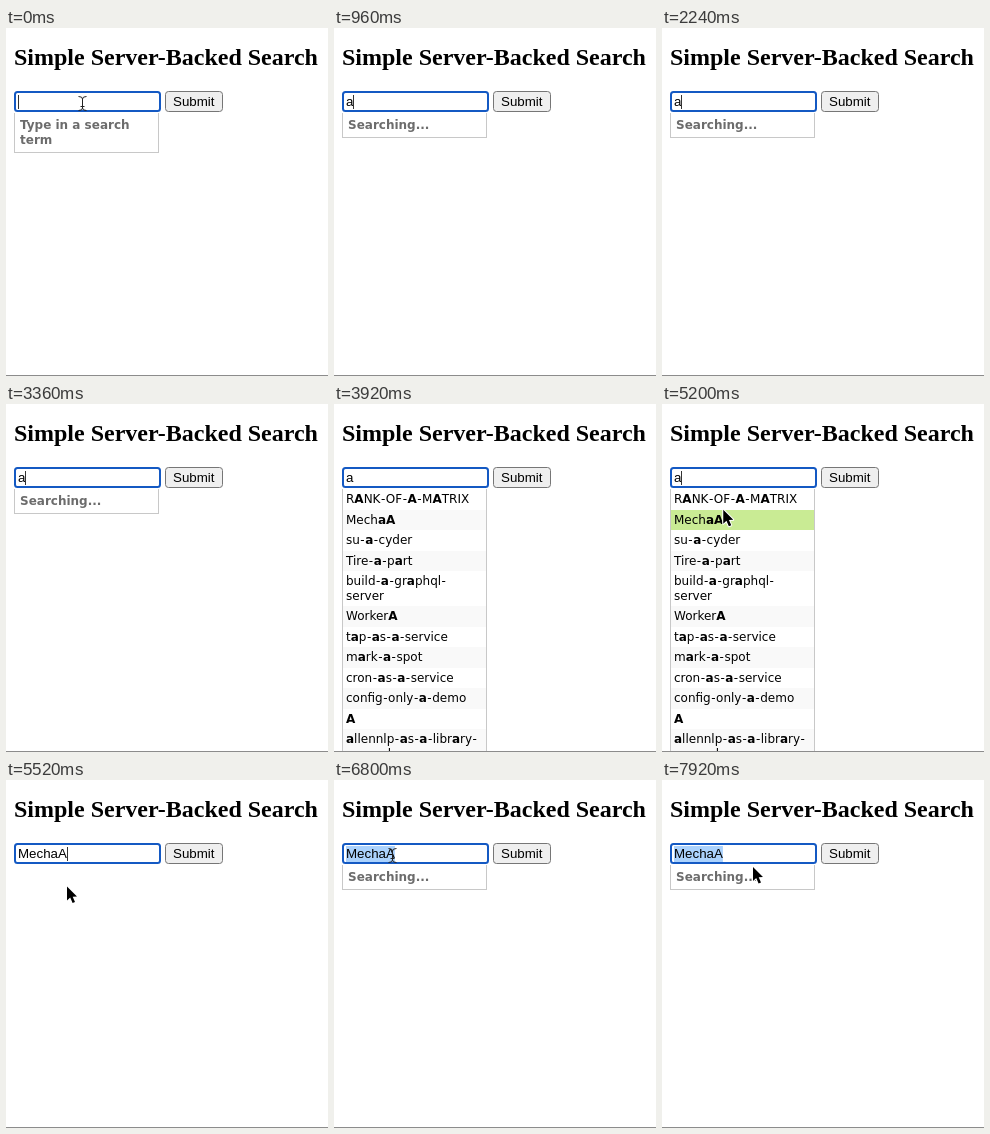
These frames come from a looping animation (322 px wide and 348 px high, 8 s). An HTML page with a canvas:

```html
<!DOCTYPE html>
<html lang="en">
<head>
<meta charset="utf-8">
<title>Simple Server-Backed Search</title>
<style>
html, body { margin: 0; width: 100%; height: 100%; overflow: hidden; background: #fff; }
canvas { display: block; width: 322px; height: 348px; }
</style>
</head>
<body>
<canvas id="stage"></canvas>
<script>
const W = 322, H = 348, LOOP = 8000;
const canvas = document.getElementById('stage');
const ctx = canvas.getContext('2d');
const dpr = window.devicePixelRatio || 1;
canvas.width = W * dpr;
canvas.height = H * dpr;

const SERIF = 'bold 24px "Liberation Serif", "Times New Roman", serif';
const SANS = '13.333px "Liberation Sans", Arial, sans-serif';
const VERDANA = '"DejaVu Sans", Verdana, sans-serif';
const REGULAR = '12px ' + VERDANA, BOLD = 'bold 12px ' + VERDANA;

const LIST_TOP = 85, LINE = 14.5;
const TYPED = 960, SLIDE = 3680, SLIDE_MS = 160, PICKED = 5440, SELECTED = 6720;

const results = [
  'RANK-OF-A-MATRIX', 'MechaA', 'su-a-cyder', 'Tire-a-part',
  'build-a-graphql-|server', 'WorkerA', 'tap-as-a-service', 'mark-a-spot',
  'cron-as-a-service', 'config-only-a-demo', 'A', 'allennlp-as-a-library-|example'
].map(name => name.split('|'));

// Pointer stops: time, x, y
const path = [
  [4480, 76, 75], [4800, 62, 103.5], [5040, 62, 103.5], [5280, 61, 106.5],
  [5920, 61, 106.5], [6400, 58, 75], [6800, 58, 75], [7280, 91, 87]
];

const ease = p => p * p * (3 - 2 * p);

function pointerAt(t) {
  if (t < TYPED) return { x: 76, y: 75 };
  if (t < path[0][0]) return null;
  for (let i = 1; i < path.length; i++) {
    const [t0, x0, y0] = path[i - 1], [t1, x1, y1] = path[i];
    if (t < t1) {
      const p = ease((t - t0) / (t1 - t0));
      return { x: x0 + (x1 - x0) * p, y: y0 + (y1 - y0) * p };
    }
  }
  const [, x, y] = path[path.length - 1];
  return { x, y };
}

function text(str, x, y, font, color) {
  ctx.font = font;
  ctx.fillStyle = color;
  ctx.fillText(str, x, y);
  return ctx.measureText(str).width;
}

function rect(x, y, w, h, color) {
  ctx.fillStyle = color;
  ctx.fillRect(x, y, w, h);
}

function box(x, y, w, h, r, fill, stroke, lineWidth) {
  ctx.beginPath();
  ctx.roundRect(x, y, w, h, r);
  ctx.fillStyle = fill;
  ctx.fill();
  ctx.strokeStyle = stroke;
  ctx.lineWidth = lineWidth;
  ctx.stroke();
}

// Bolds every match of the search term; hyphens get a little air.
function matchText(str, x, y) {
  for (const part of str.split(/(a|-)/i)) {
    if (!part) continue;
    const gap = part === '-' ? 0.5 : 0;
    x += gap + text(part, x + gap, y, /^a$/i.test(part) ? BOLD : REGULAR, '#000') + gap;
  }
}

function panel(height) {
  rect(8, LIST_TOP, 145, height + 1, '#c8c8c8');
  rect(9, LIST_TOP, 143, height, '#fff');
}

function message(lines) {
  panel(lines.length * LINE + 10 | 0);
  lines.forEach((line, i) => text(line, 14, Math.round(101.4 + i * LINE), BOLD, '#6c6c6c'));
}

function list(hover, open) {
  const rows = results.map(lines => lines.length * LINE + 6);
  const full = rows.reduce((sum, h) => sum + h, 0);
  ctx.save();
  ctx.beginPath();
  ctx.rect(0, LIST_TOP, W, full * open + 1);
  ctx.clip();
  panel(full * open);
  let top = LIST_TOP;
  results.forEach((lines, i) => {
    const h = rows[i];
    const over = hover && hover.y >= top && hover.y < top + h;
    rect(9, Math.round(top), 143, Math.round(h), over ? '#c9eb94' : i % 2 ? '#f9f9f9' : '#fff');
    lines.forEach((line, n) => matchText(line, 12, Math.round(top + 14.3 + n * LINE)));
    top += h;
  });
  ctx.restore();
}

function arrow(x, y) {
  ctx.save();
  ctx.translate(x, y);
  ctx.beginPath();
  for (const [px, py] of [[0, 0], [0, 14], [3.2, 11], [5.6, 16.6], [8, 15.6], [5.7, 10.2], [10, 10]]) {
    ctx.lineTo(px, py);
  }
  ctx.closePath();
  ctx.lineJoin = 'round';
  ctx.strokeStyle = '#fff';
  ctx.lineWidth = 2;
  ctx.stroke();
  ctx.fillStyle = '#000';
  ctx.fill();
  ctx.restore();
}

function beam(x, y) {
  ctx.beginPath();
  ctx.moveTo(x - 3.5, y - 6.5);
  ctx.quadraticCurveTo(x + 0.5, y - 6.5, x + 0.5, y - 4);
  ctx.lineTo(x + 0.5, y + 5);
  ctx.quadraticCurveTo(x + 0.5, y + 7.5, x - 3.5, y + 7.5);
  ctx.moveTo(x + 4.5, y - 6.5);
  ctx.quadraticCurveTo(x + 0.5, y - 6.5, x + 0.5, y - 4);
  ctx.moveTo(x + 0.5, y + 5);
  ctx.quadraticCurveTo(x + 0.5, y + 7.5, x + 4.5, y + 7.5);
  ctx.moveTo(x - 1.5, y + 3.5);
  ctx.lineTo(x + 2.5, y + 3.5);
  ctx.strokeStyle = '#222';
  ctx.lineWidth = 1;
  ctx.stroke();
}

function field(t) {
  box(9, 64, 145, 19, 2.5, '#fff', '#1459c3', 2);
  const value = t < TYPED ? '' : t < PICKED ? 'a' : 'MechaA';
  ctx.font = SANS;
  const width = ctx.measureText(value).width;
  const selected = t >= SELECTED;
  if (selected) rect(12, 66, width, 16, '#abd2fd');
  text(value, 12, 78, SANS, '#000');
  const since = t < TYPED ? t + 100 : t < PICKED ? t - TYPED : t - PICKED;
  if (!selected && Math.floor(since / 500) % 2 === 0) {
    rect(Math.round(12 + width), 67, 1, 14, '#333');
  }
}

function draw(t) {
  ctx.setTransform(dpr, 0, 0, dpr, 0, 0);
  rect(0, 0, W, H, '#fff');
  text('Simple Server-Backed Search', 8, 37, SERIF, '#000');
  box(159.5, 63.5, 57, 20, 3, '#efefef', '#767676', 1);
  text('Submit', 167, 78, SANS, '#000');
  field(t);

  const pointer = pointerAt(t);
  if (t < TYPED) message(['Type in a search', 'term']);
  else if (t < SLIDE) message(['Searching...']);
  else if (t < PICKED) list(pointer, Math.min(1, (t - SLIDE) / SLIDE_MS));
  else if (t >= SELECTED) message(['Searching...']);

  rect(0, 347, W, 1, '#8c8c8c');
  if (pointer) (pointer.y < LIST_TOP ? beam : arrow)(pointer.x, pointer.y);
}

const start = performance.now();
function tick() {
  draw((performance.now() - start) % LOOP);
  requestAnimationFrame(tick);
}
draw(0);
requestAnimationFrame(tick);
</script>
</body>
</html>
```
